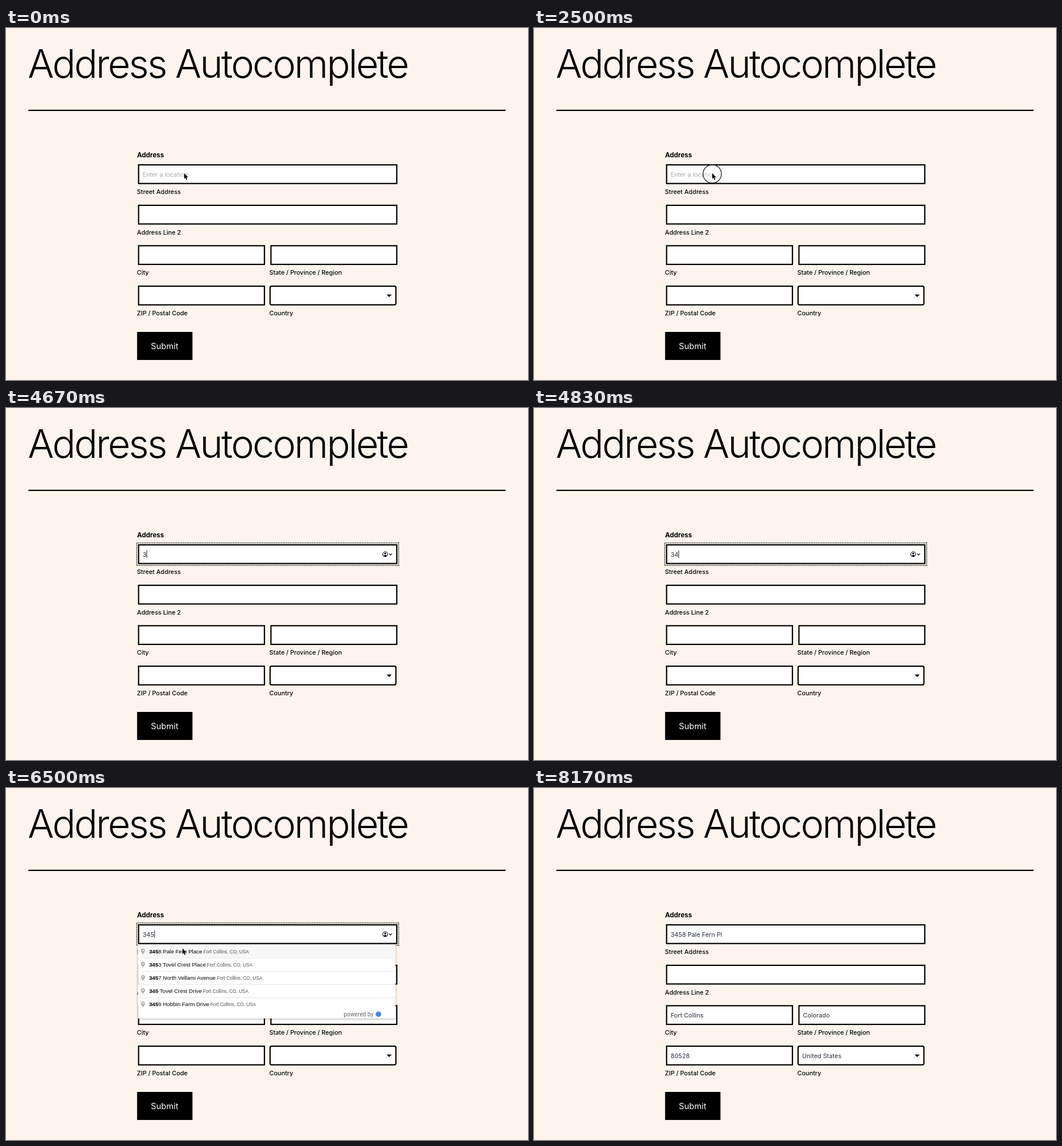
These frames come from a looping animation (911 px wide and 615 px high, 8.34 s). An HTML page:

```html
<!DOCTYPE html>
<html lang="en">
<head>
<meta charset="utf-8">
<title>Address Autocomplete</title>
<style>
  html, body { margin: 0; width: 100%; height: 100%; overflow: hidden; background: #fdf5ed; }
  svg { display: block; width: 911px; height: 615px; font-family: Inter, sans-serif; font-optical-sizing: none; }
  text { white-space: pre; }
  .title { font-size: 68px; font-weight: 300; letter-spacing: -2.75px; }
  .head { font-size: 11.5px; font-weight: 700; }
  .label { font-size: 10.75px; font-weight: 500; }
  .value { font-size: 10.8px; fill: #28303d; }
  .hint { font-size: 10.8px; fill: #a9a9a9; }
  .button { font-size: 14.6px; fill: #fff; }
  .box { fill: #fff; stroke: #000; stroke-width: 2.2; }
  .item { font: 9.65px "Liberation Sans", Arial, sans-serif; }
  .num { font-weight: 700; }
  .place { font-size: 8.17px; fill: #515151; }
  .credit { font: 10.2px Roboto, sans-serif; fill: #666; }
  .menu { filter: drop-shadow(0 1.5px 2px rgba(0, 0, 0, .3)); }
</style>
</head>
<body>
<svg id="stage" viewBox="0 0 911 615"></svg>
<script>
const NS = "http://www.w3.org/2000/svg";
const LOOP = 8340;
const stage = document.getElementById("stage");

function add(parent, tag, attrs = {}, text) {
  const el = document.createElementNS(NS, tag);
  for (const key in attrs) el.setAttribute(key, attrs[key]);
  if (text !== undefined) el.textContent = text;
  parent.append(el);
  return el;
}
const group = (parent = stage) => add(parent, "g");
const write = (parent, cls, x, y, text) => add(parent, "text", { class: cls, x, y }, text);
const show = (el, on) => el.setAttribute("visibility", on ? "visible" : "hidden");

// Page and form
write(stage, "title", 38, 87.3, "Address Autocomplete");
add(stage, "rect", { x: 39, y: 142.8, width: 833, height: 2.2 });
write(stage, "head", 228.8, 226, "Address");

const LEFT = 230.3, FULL = 452.8, HALF = 221.8;
const fields = [
  { x: LEFT, y: 238, w: FULL, label: "Street Address" },
  { x: LEFT, y: 308.7, w: FULL, label: "Address Line 2" },
  { x: LEFT, y: 379.3, w: HALF, label: "City", value: "Fort Collins" },
  { x: 461.3, y: 379.3, w: HALF, label: "State / Province / Region", value: "Colorado" },
  { x: LEFT, y: 450, w: HALF, label: "ZIP / Postal Code", value: "80528" },
  { x: 459.8, y: 450, w: HALF, label: "Country", value: "United States", rx: 2.6 }
];
const filled = [];
for (const { x, y, w, label, value, rx = 0 } of fields) {
  add(stage, "rect", { class: "box", x: x + 1.1, y: y + 1.1, width: w - 2.2, height: 32.6, rx });
  write(stage, "label", x < 400 ? 228.6 : 459.6, y + 52.1, label);
  if (value) filled.push(write(stage, "value", x + 8.2, y + 21.7, value));
}
add(stage, "path", { d: "M665 465.9h7.6l-3.8 3.8z", stroke: "#000", "stroke-width": .6, "stroke-linejoin": "round" });
add(stage, "rect", { x: 228.8, y: 531, width: 96.6, height: 49 });
write(stage, "button", 252.8, 560.9, "Submit");

// Street field content and focus marks
const hint = write(stage, "hint", 238.2, 259.8, "Enter a location");
const typed = write(stage, "value", 238.4, 259.7, "");
const caret = add(stage, "rect", { y: 248.8, width: .9, height: 13 });
const focus = group();
add(focus, "rect", {
  x: LEFT - 2.2, y: 235.8, width: FULL + 4.4, height: 39.2,
  fill: "none", stroke: "#000", "stroke-width": 1.5, "stroke-dasharray": "1.5 1.5"
});
const icon = group(focus);
add(icon, "circle", { cx: 661.8, cy: 255.5, r: 4.2, fill: "none", stroke: "#000", "stroke-width": 1.1 });
add(icon, "circle", { cx: 661.8, cy: 254.3, r: 1.6 });
add(icon, "path", { d: "M658.9 258.2q2.9-3 5.8 0q-2.9 2.4-5.8 0z" });
add(icon, "path", { d: "M668.5 254.3l2.6 2.6 2.6-2.6", fill: "none", stroke: "#000", "stroke-width": 1.2 });

// Suggestion menu
const ROW = 23.1, TOP = 273.7, WIDTH = 449.3;
function makeMenu(match, streets) {
  const menu = group();
  const bar = (y, height, fill) => add(menu, "rect", { x: LEFT, y, width: WIDTH, height, fill });
  bar(TOP, 129, "#fff").setAttribute("class", "menu");
  const hover = bar(TOP, ROW, "#f7f7f7");
  streets.forEach((street, i) => {
    const y = TOP + i * ROW;
    bar(y, .8, "#e3e3e3");
    add(menu, "path", {
      d: `M239 ${y + 17.8}c-.5-3-3.5-4.5-3.5-7.5a3.5 3.5 0 0 1 7 0c0 3-3 4.5-3.5 7.5z`,
      fill: "#b0b0b0"
    });
    add(menu, "circle", { cx: 239, cy: y + 10.2, r: 1.2, fill: "#fff" });
    const line = write(menu, "item", 249.7, y + 15.2, "");
    add(line, "tspan", { class: "num" }, match);
    add(line, "tspan", {}, street);
    add(line, "tspan", { class: "place", dx: 2.3 }, "Fort Collins, CO, USA");
  });
  write(menu, "credit", 589.2, 398.6, "powered by");
  add(menu, "circle", { cx: 650, cy: 395.2, r: 4.8, fill: "#4285f4" });
  return { menu, hover };
}
const menus = {
  "34": makeMenu("34", [
    "92 West Tarnelby Road", "37 Ostrellen Drive", "28 Plumvane Drive",
    "04 Brindlow Road", "83 Quillmere Drive"
  ]),
  "345": makeMenu("345", [
    "8 Pale Fern Place", "3 Tovel Crest Place", "7 North Vellami Avenue",
    " Tovel Crest Drive", "9 Hobbin Farm Drive"
  ])
};

// Pointer and click ring
const ring = add(stage, "circle", {
  cx: 311, cy: 254.9, r: 16, fill: "#fff", "fill-opacity": .35, stroke: "#111", "stroke-width": 1.2
});
const pointer = add(stage, "path", {
  d: "M0 0v9.6l2.1-1.9 1.6 3.7 1.7-.8-1.6-3.5h3z",
  stroke: "#fff", "stroke-width": .8, "stroke-linejoin": "round", "paint-order": "stroke"
});

// Each step changes only the listed parts of the state
const start = { text: "", caret: false, focus: false, done: false, menu: "", hover: false, ring: false, mouse: [311, 253.8] };
const steps = [
  [2500, { ring: true }],
  [2670, { ring: false }],
  [3170, { focus: true, caret: true }],
  [4000, { caret: false }],
  [4330, { text: "3", caret: true, mouse: null }],
  [4830, { text: "34" }],
  [5000, { menu: "34" }],
  [5330, { text: "345" }],
  [5500, { menu: "345" }],
  [5830, { mouse: [311, 256] }],
  [6000, { mouse: [310, 266] }],
  [6170, { mouse: [308.5, 278], hover: true }],
  [6330, { mouse: [308, 280.3] }],
  [6670, { text: "3458 Pale Fern Pl", focus: false, caret: false, menu: "", hover: false, done: true }],
  [7830, { mouse: [345, 372] }],
  [8000, { mouse: [521, 597] }],
  [8170, { mouse: null }]
];

function draw(t) {
  const s = { ...start };
  for (const [at, change] of steps) if (t >= at) Object.assign(s, change);
  typed.textContent = s.text;
  caret.setAttribute("x", 238.6 + (s.text ? typed.getComputedTextLength() : 0));
  show(hint, !s.text);
  show(caret, s.caret);
  show(focus, s.focus);
  show(ring, s.ring);
  filled.forEach(el => show(el, s.done));
  for (const key in menus) {
    menus[key].menu.setAttribute("display", key === s.menu ? "inline" : "none");
    show(menus[key].hover, s.hover);
  }
  show(pointer, s.mouse);
  if (s.mouse) pointer.setAttribute("transform", `translate(${s.mouse})`);
}

const begin = performance.now();
function tick() {
  draw((performance.now() - begin) % LOOP);
  requestAnimationFrame(tick);
}
tick();
</script>
</body>
</html>
```
